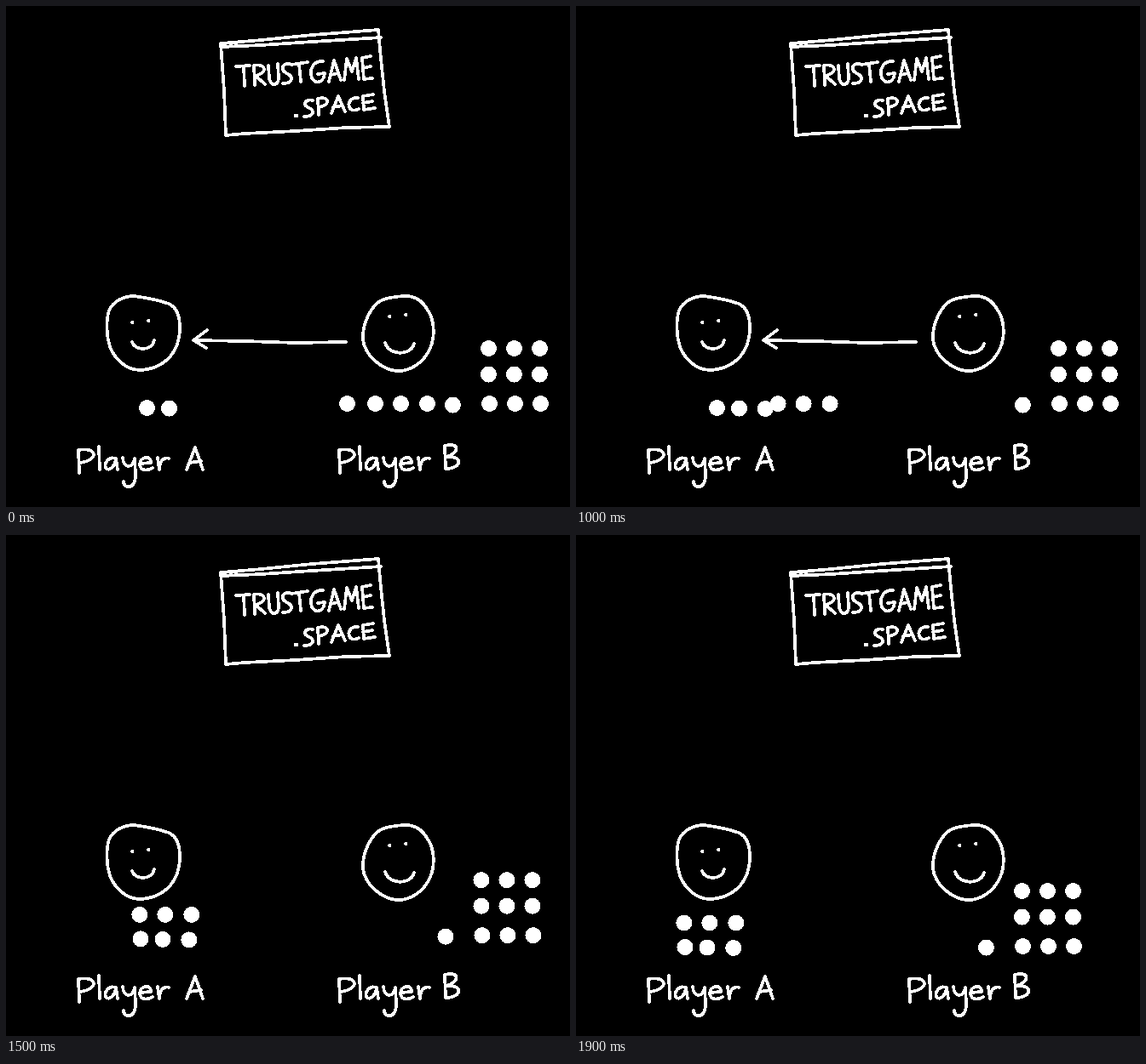
An HTML page that plays this animation: 662 by 589 pixels, repeating every 3600 ms.

```html
<!DOCTYPE html>
<html lang="en">
<head>
<meta charset="utf-8">
<title>Trust game</title>
<style>
  html, body { margin: 0; height: 100%; overflow: hidden; background: #000; }
  svg { display: block; width: 100%; height: 100%; }
  .ink { fill: none; stroke: #fff; stroke-width: 3.7; stroke-linecap: round; stroke-linejoin: round; }
  .dots { fill: #fff; }
</style>
</head>
<body>
<svg viewBox="0 0 662 589" shape-rendering="crispEdges">
  <g class="ink">
    <!-- browser window -->
    <path d="M252 44 L300 40 L360 34 L437 28 L440 62 L444 100 L450 142 L400 143 L340 147 L280 150 L258 152 L256 100 L252 44"/>
    <path d="M254 48 L300 46 L360 42 L440 37"/>
    <path d="M257 46h0M264 46h0M270 45h0"/>

    <g role="img" aria-label="TRUSTGAME.SPACE">
      <path d="M270 71 L286 70 M279 71 L280 94"/>
      <path d="M292 93 L291 70 C306 67 307 79 293 82 L304 92"/>
      <path d="M308 70 L309 85 C311 95 319 94 320 85 L319 68"/>
      <path d="M333 68 C324 67 322 75 329 79 C338 83 337 91 325 91"/>
      <path d="M335 69 L354 66 M344 68 L346 89"/>
      <path d="M372 65 C361 64 357 74 358 81 C360 93 373 92 374 79 L366 80"/>
      <path d="M379 89 L385 64 L393 87 M381 81 L390 79"/>
      <path d="M397 87 L400 62 L406 77 L411 61 L414 86"/>
      <path d="M428 59 L418 61 L420 86 L430 85 M419 73 L428 71"/>
      <path d="M340 129h1" stroke-width="4.5"/>
      <path d="M360 111 C351 109 348 116 354 119 C364 123 361 130 350 130"/>
      <path d="M367 128 L366 109 C380 105 381 117 367 119"/>
      <path d="M382 126 L390 106 L398 124 M384 119 L395 117"/>
      <path d="M413 108 C404 107 401 115 403 119 C405 124 411 123 414 121"/>
      <path d="M431 104 L419 106 L420 122 L433 120 M419 114 L430 112"/>
    </g>

    <!-- faces -->
    <path d="M150 341 C165 343 180 346 191 350 C200 354 204 365 204 378 C204 396 198 407 190 415 C180 424 168 428 156 428 C140 427 128 415 122 401 C118 388 117 370 121 358 C126 347 138 341 150 341Z"/>
    <path d="M148 395 C152 406 171 406 174 393 M148 372h.5M167 370h.5"/>
    <path d="M466 341 C480 340 488 346 494 356 C503 368 504 388 498 402 C490 420 474 430 458 429 C440 427 421 410 419 392 C418 376 426 358 436 349 C444 343 456 342 466 341Z"/>
    <path d="M445 396 C449 411 475 412 479 397 M450 365h.5M469 363h.5"/>

    <path id="arrow" d="M399 395 L340 396 L280 394 L221 393 M236 381 L220 393 L235 402"/>

    <!-- labels -->
    <g id="player" role="img" aria-label="Player">
      <path d="M86 549 L85 522 C108 518 109 534 87 537"/>
      <path d="M109 518 L110 545"/>
      <path d="M128 532 C120 529 115 538 117 543 C121 548 128 541 129 532 L131 545"/>
      <path d="M137 531 C138 543 148 545 151 532 L152 551 C152 569 138 568 138 559"/>
      <path d="M157 538 L170 537 C170 527 157 530 157 539 C158 548 167 546 172 543"/>
      <path d="M178 531 L180 545 C180 534 186 530 191 532"/>
    </g>
    <use href="#player" x="306"/>
    <path aria-label="A" d="M212 545 L222 519 L231 545 M215 537 L229 535"/>
    <path aria-label="B" d="M516 544 L515 517 C532 512 534 526 516 530 C537 528 536 544 516 544"/>
  </g>
  <g class="dots" id="coins"></g>
</svg>
<script>
const LOOP = 3600, STEP = 100;
const box = document.getElementById('coins');
const arrow = document.getElementById('arrow');

// Per-step shifts: pay across, stack up, then settle under each player.
const still = [0, 0], pay = [-29.7, 1], stack = [-18.2, -5.9];
const settleA = [-7.5, 2.4], settleB = [-8.6, 3.2];
const coins = [];

function addCoin(x, y, ...moves) {
  const dot = document.createElementNS('http://www.w3.org/2000/svg', 'circle');
  dot.setAttribute('r', 9.5);
  box.append(dot);
  coins.push({ dot, x, y, moves });
}

addCoin(165.5, 472.5, still, still, settleA);
addCoin(191.5, 473, still, still, settleA);
[400.5, 433.5, 463.5, 494.5].forEach((x, i) =>
  addCoin(x, 467.5, pay, i ? stack : still, settleA));
addCoin(524.5, 469, still, still, settleB);
[402.5, 433, 467.5].forEach((y, row) => {
  for (let col = 0; col < 3; col++)
    addCoin(566.5 + 30 * col + (row === 2), y, still, still, settleB);
});

const clamp = (v, max) => Math.max(0, Math.min(max, v));

function draw(now) {
  const n = Math.floor(now % LOOP / STEP);
  const steps = [clamp(n - 3, 6), clamp(n - 9, 5), clamp(n - 14, 5)];
  for (const { dot, x, y, moves } of coins) {
    const along = axis => moves.reduce((sum, m, i) => sum + m[axis] * steps[i], 0);
    dot.setAttribute('cx', x + along(0));
    dot.setAttribute('cy', y + along(1));
  }
  arrow.style.display = steps[2] ? 'none' : '';
}

const start = performance.now();
function tick() {
  draw(performance.now() - start);
  requestAnimationFrame(tick);
}
tick();
</script>
</body>
</html>
```
